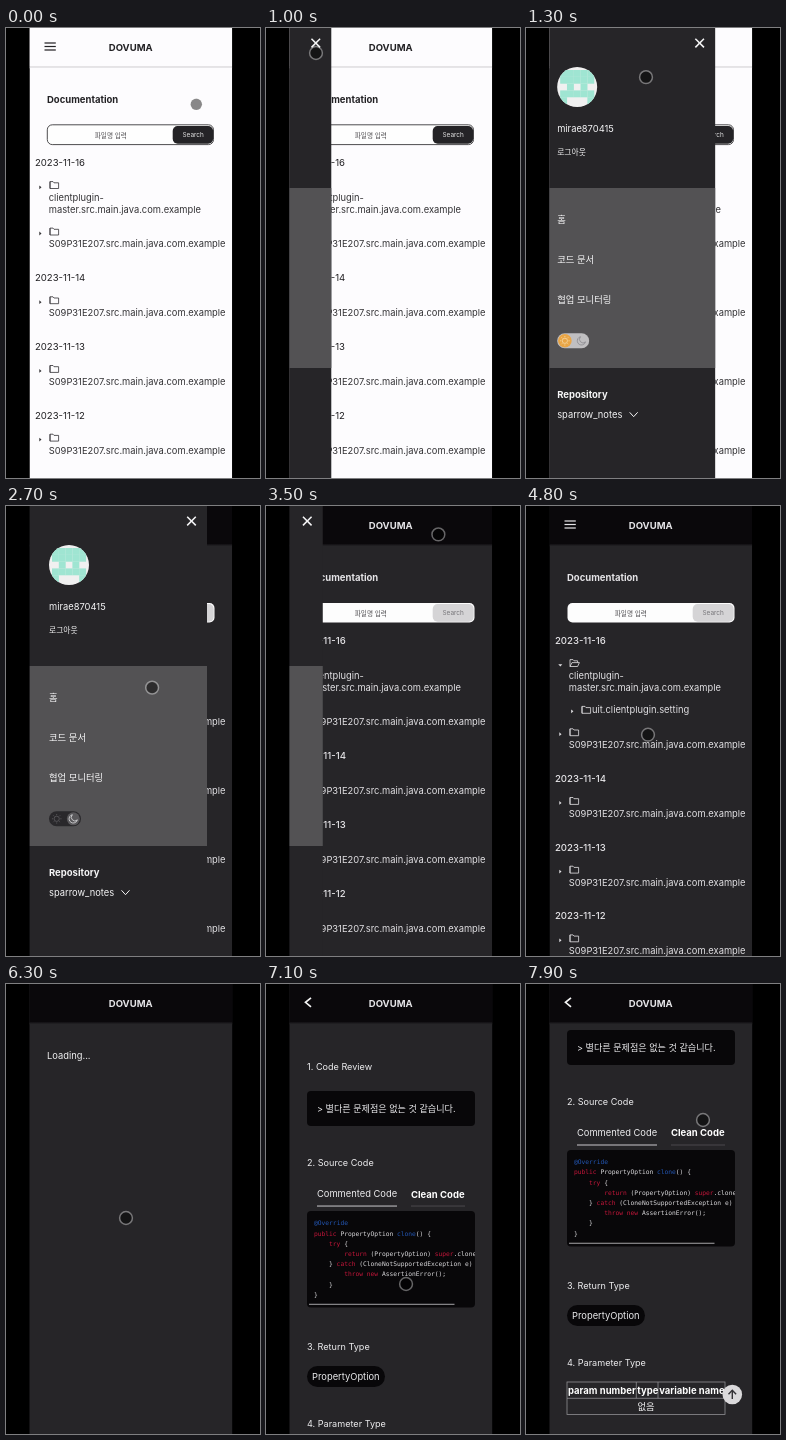
These frames come from a looping animation (254 by 450 pixels, 8000 ms). An HTML page with a canvas:

```html
<!DOCTYPE html>
<html lang="ko">
<head>
<meta charset="utf-8">
<title>Documentation browser</title>
<style>
html, body { margin: 0; width: 100%; height: 100%; overflow: hidden; background: #000; }
canvas { display: block; width: 254px; height: 450px; }
</style>
</head>
<body>
<canvas id="stage"></canvas>
<script>
const W = 254, H = 450, LOOP = 8000;
const LEFT = 23.5, RIGHT = 226.2, HEADER = 38.3;
const SANS = 'Inter, "Noto Sans CJK KR", "Noto Sans CJK", sans-serif';
const MONO = '"DejaVu Sans Mono", monospace';
const BASE = 9.35, ROW = 22.7;
const BOLD = { weight: 700, size: 9.5 };

const canvas = document.getElementById('stage');
const ctx = canvas.getContext('2d');
const dpr = window.devicePixelRatio || 1;
canvas.width = W * dpr;
canvas.height = H * dpr;

const LIGHT = { page: '#fdfcfe', header: '#fdfcfe', ink: '#333235', title: '#222124', line: '#c4c3c6', date: 400 };
const DARK = { page: '#262528', header: '#0a080b', ink: '#e2e1e4', title: '#e6e5e8', line: '#141316', date: 500 };

// Pointer path: time, x, y
const PATH = [
  [0, 190.3, 76.3], [100, 190.3, 76.3], [800, 50, 25], [1000, 50, 25], [1300, 120, 49],
  [1800, 66, 312], [1950, 66, 312], [2200, 69, 313], [2350, 69, 313], [2700, 146, 182],
  [3150, 185, 16], [3350, 185, 16], [4000, 92.7, 135.5], [4200, 94, 160], [4400, 98, 176],
  [4550, 98, 176], [4800, 122, 228.7], [5100, 112, 207], [5300, 112, 207], [5800, 129, 236],
  [6050, 129, 236], [6120, 120, 234], [6800, 120, 234], [7100, 140, 300], [7500, 158, 190],
  [7900, 177, 136], [8000, 177, 136]
];

const clamp = v => Math.max(0, Math.min(1, v));
const easeOut = p => 1 - Math.pow(1 - clamp(p), 3);

// Monotone cubic through the path points
function along(axis, t) {
  let i = 0;
  while (i < PATH.length - 2 && PATH[i + 1][0] <= t) i++;
  const slope = k => k < 0 || k >= PATH.length - 1 ? 0
    : (PATH[k + 1][axis] - PATH[k][axis]) / (PATH[k + 1][0] - PATH[k][0]);
  const tangent = k => {
    const a = slope(k - 1), b = slope(k);
    return a * b <= 0 ? 0 : 2 * a * b / (a + b);
  };
  const d = PATH[i + 1][0] - PATH[i][0], u = (t - PATH[i][0]) / d, v = 1 - u;
  return PATH[i][axis] * (1 + 2 * u) * v * v + tangent(i) * d * u * v * v
    + PATH[i + 1][axis] * u * u * (3 - 2 * u) - tangent(i + 1) * d * u * u * v;
}

function box(x, y, w, h, color) {
  ctx.fillStyle = color;
  ctx.fillRect(x, y, w, h);
}

function round(x, y, w, h, r, fill, stroke, width = 1) {
  ctx.beginPath();
  ctx.roundRect(x, y, w, h, r);
  if (fill) { ctx.fillStyle = fill; ctx.fill(); }
  if (stroke) { ctx.strokeStyle = stroke; ctx.lineWidth = width; ctx.stroke(); }
}

function disc(x, y, r, fill, stroke, width = 1) {
  ctx.beginPath();
  ctx.arc(x, y, r, 0, Math.PI * 2);
  if (fill) { ctx.fillStyle = fill; ctx.fill(); }
  if (stroke) { ctx.strokeStyle = stroke; ctx.lineWidth = width; ctx.stroke(); }
}

function line(points, color, width = 1) {
  ctx.beginPath();
  points.forEach(([x, y], i) => i ? ctx.lineTo(x, y) : ctx.moveTo(x, y));
  ctx.strokeStyle = color;
  ctx.lineWidth = width;
  ctx.stroke();
}

// y is the middle of the capitals
function text(s, x, y, color, { size = BASE, weight = 400, align = 'left', font = SANS } = {}) {
  ctx.font = `${weight} ${size}px ${font}`;
  ctx.textAlign = align;
  ctx.fillStyle = color;
  ctx.fillText(s, x, y + size * 0.365);
}

function clipTo(x, y, w, h, draw) {
  ctx.save();
  ctx.beginPath();
  ctx.rect(x, y, w, h);
  ctx.clip();
  draw();
  ctx.restore();
}

function header(c, icon) {
  const shade = ctx.createLinearGradient(0, HEADER, 0, HEADER + 2);
  shade.addColorStop(0, c.line);
  shade.addColorStop(1, c.page);
  box(LEFT, HEADER, RIGHT - LEFT, 2, shade);
  box(LEFT, 0, RIGHT - LEFT, HEADER, c.header);
  text('DOVUMA', 124.7, 19.3, c.title, { ...BOLD, align: 'center' });
  if (icon === 'menu') [15, 18.5, 22].forEach(y => box(38.5, y - 0.6, 11.3, 1.2, c.title));
  if (icon === 'back') line([[45, 13.8], [39.5, 18.3], [45, 22.8]], '#f4f4f4', 1.7);
}

function triangle(x, y, open, color) {
  ctx.beginPath();
  if (open) { ctx.moveTo(x - 2, y - 1); ctx.lineTo(x + 2, y - 1); ctx.lineTo(x, y + 1.2); }
  else { ctx.moveTo(x - 1, y - 1.9); ctx.lineTo(x + 1.2, y); ctx.lineTo(x - 1, y + 1.9); }
  ctx.fillStyle = color;
  ctx.fill();
}

function folder(x, y, open, color) {
  const l = x - 4.3, r = x + 4.3, t = y - 3.4, b = y + 3.5, w = 0.8;
  if (open) {
    line([[l, b], [l, t], [l + 3, t], [l + 4, t + 1.2], [r - 1, t + 1.2], [r - 1, t + 3]], color, w);
    line([[l, b], [l + 2, t + 3], [r + 0.8, t + 3], [r - 1, b], [l, b]], color, w);
  } else {
    line([[l, b], [l, t], [l + 3, t], [l + 4, t + 1.2], [r, t + 1.2], [r, b], [l, b], [l, t]], color, w);
  }
}

function search(dark) {
  if (dark) {
    round(41.5, 97, 167, 19.5, 5, '#fdfdfd');
    round(166.7, 98, 41, 17.7, 5, '#d5d4d6');
  } else {
    round(41.3, 96.8, 166.2, 19.8, 5, '#fefefe', '#3a393c', 0.9);
    round(166.7, 98, 40.4, 17.8, 5, '#242326');
  }
  text('파일명 입력', 104.8, 107.2, '#4a494c', { size: 6.6, weight: 500, align: 'center' });
  text('Search', 187.1, 106.7, dark ? '#77767a' : '#e4e4e4', { size: 6.4, align: 'center' });
}

function packageRow(y, c) {
  triangle(34.3, y + 2, false, c.ink);
  folder(48.3, y, false, c.ink);
  text('S09P31E207.src.main.java.com.example', 42.7, y + 12.5, c.ink);
}

function listPage(t, dark) {
  const c = dark ? DARK : LIGHT;
  const open = t >= 4600, deep = t >= 5400;
  const shift = ROW * (open + deep);
  const date = (day, y) => text('2023-11-' + day, 28.9, y, c.title, { size: 9.6, weight: c.date });
  box(LEFT, 0, RIGHT - LEFT, H, c.page);
  header(c, 'menu');
  text('Documentation', 41, 71.5, c.title, BOLD);
  search(dark);
  date(16, 134.3);
  triangle(34.3, 159.3, open, c.ink);
  folder(48.3, 157, open, c.ink);
  text('clientplugin-', 42.7, 169.6, c.ink);
  text('master.src.main.java.com.example', 42.7, 181.3, c.ink);
  if (open) {
    triangle(46.2, 205.3, deep, c.ink);
    folder(60.3, 203.8, deep, c.ink);
    text('uit.clientplugin.setting', 66, 204, c.ink);
  }
  if (deep) {
    triangle(58.2, 228, false, c.ink);
    folder(72.3, 226.5, false, c.ink);
    text('PropertyOption', 78, 226.7, c.ink);
  }
  packageRow(203.5 + shift, c);
  [14, 13, 12].forEach((day, i) => {
    const y = 249.7 + i * 68.7 + shift;
    date(day, y);
    packageRow(y + 22.5, c);
  });
}

function avatar(x, y) {
  ctx.save();
  disc(x, y, 20, '#f0f0f0');
  ctx.clip();
  const cell = 6.8;
  ['11111', '11111', '01010', '11111', '10001'].forEach((row, j) => {
    [...row].forEach((on, i) => {
      if (on === '1') box(x + (i - 2.5) * cell, y + (j - 2.5) * cell, cell + 0.1, cell + 0.1, '#9fe5d2');
    });
  });
  ctx.restore();
}

function moon(x, y, color) {
  ctx.beginPath();
  ctx.arc(x, y, 4.2, -1.8, 0.25, true);
  ctx.arc(x + 1.6, y - 1.5, 3.6, 0.8, 3.9);
  ctx.closePath();
  ctx.strokeStyle = color;
  ctx.lineWidth = 0.8;
  ctx.stroke();
}

function sun(x, y, color) {
  disc(x, y, 2.6, null, color, 0.8);
  for (let a = 0; a < 8; a++) {
    const p = Math.cos(a * Math.PI / 4), q = Math.sin(a * Math.PI / 4);
    line([[x + p * 3.6, y + q * 3.6], [x + p * 4.8, y + q * 4.8]], color, 0.8);
  }
}

function toggle(dark) {
  round(43, 305.3, 32, 15, 7.5, dark ? '#29282b' : '#c0bfc1');
  if (dark) {
    sun(50.7, 312.8, '#5d5c60');
    disc(67.3, 312.8, 6.5, '#59585b');
    moon(67.3, 312.8, '#e0e0e2');
  } else {
    disc(50.7, 312.8, 6.8, '#e9a545');
    sun(50.7, 312.8, '#f8d9a4');
    moon(67.3, 312.8, '#8b8a8e');
  }
}

function drawer(shown, dark) {
  if (shown <= 0) return;
  clipTo(LEFT, 0, RIGHT - LEFT, H, () => {
    ctx.translate(-178 * (1 - shown), 0);
    box(LEFT, 0, 177.5, H, '#262528');
    box(LEFT, 160, 177.5, 180, '#535254');
    const ink = '#f5f5f6';
    line([[181.2, 10.8], [189.8, 19.4]], ink, 1.5);
    line([[189.8, 10.8], [181.2, 19.4]], ink, 1.5);
    avatar(63, 59);
    text('mirae870415', 43, 100.3, ink);
    text('로그아웃', 43, 124, ink, { size: 7.8 });
    text('홈', 43, 191.5, ink);
    text('코드 문서', 43, 231.8, ink);
    text('협업 모니터링', 43, 271.8, ink);
    toggle(dark);
    text('Repository', 43, 366.7, ink, BOLD);
    text('sparrow_notes', 43, 386.7, ink);
    line([[115.5, 384.3], [119.5, 388.7], [123.5, 384.3]], ink);
  });
}

const RED = '#c4163a', BLUE = '#2357b5', PLAIN = '#dcdbde';
const CODE = [
  [0, [BLUE, '@Override']],
  [0, [RED, 'public'], [PLAIN, ' PropertyOption '], [BLUE, 'clone'], [PLAIN, '() {']],
  [4, [RED, 'try'], [PLAIN, ' {']],
  [8, [RED, 'return'], [PLAIN, ' (PropertyOption) '], [RED, 'super'], [PLAIN, '.clone();']],
  [4, [PLAIN, '} '], [RED, 'catch'], [PLAIN, ' (CloneNotSupportedException e) {']],
  [8, [RED, 'throw new'], [PLAIN, ' AssertionError();']],
  [4, [PLAIN, '}']],
  [0, [PLAIN, '}']]
];

function codeBlock() {
  round(41, 166, 168, 96.5, 4, '#080709');
  clipTo(41, 166, 168, 96, () => {
    CODE.forEach(([indent, ...parts], i) => {
      let x = 48 + indent * 3.77;
      parts.forEach(([color, s]) => {
        text(s, x, 178 + i * 10.2, color, { size: 6.27, font: MONO });
        x += ctx.measureText(s).width;
      });
    });
  });
  box(43, 258.7, 145.5, 1.2, '#8b8a8d');
}

function table() {
  const edge = '#8f8e92';
  ctx.strokeStyle = edge;
  ctx.lineWidth = 0.8;
  ctx.strokeRect(41, 398, 158, 32.5);
  line([[41, 414.3], [199, 414.3]], edge, 0.8);
  [110.3, 132].forEach(x => line([[x, 398], [x, 414.3]], edge, 0.8));
  text('param number', 42, 406.3, '#fff', BOLD);
  text('type', 111.3, 406.3, '#fff', BOLD);
  text('variable name', 133.2, 406.3, '#fff', BOLD);
  text('없음', 120, 422.3, '#f0f0f1', { align: 'center' });
}

function docPage(t) {
  const ink = '#ececee', heading = { size: 9.1 };
  const scroll = easeOut((t - 7000) / 880);
  box(LEFT, 0, RIGHT - LEFT, H, DARK.page);
  clipTo(LEFT, HEADER, RIGHT - LEFT, H - HEADER, () => {
    ctx.translate(0, 88 * (1 - scroll));
    text('1. Code Review', 41, 22, ink, heading);
    round(41, 46, 168, 35, 4, '#080709');
    text('> 별다른 문제점은 없는 것 같습니다.', 51, 63.3, ink, { size: 9.1 });
    text('2. Source Code', 41, 117.5, ink, heading);
    text('Commented Code', 51, 149, ink);
    text('Clean Code', 145, 149, '#fff', BOLD);
    box(51, 160.5, 80, 1, '#c9c8cb');
    box(145, 160.5, 54, 1, '#4a494c');
    codeBlock();
    text('3. Return Type', 41, 302, ink, heading);
    round(41, 321, 78, 21, 10.5, '#080709');
    text('PropertyOption', 46, 331.5, ink);
    text('4. Parameter Type', 41, 379, ink, heading);
    table();
  });
  header(DARK, 'back');
  if (t >= 7200) {
    disc(206.3, 410.5, 9.8, '#dad9db');
    line([[206.3, 415], [206.3, 406.5]], '#333236', 1.4);
    line([[202.5, 410.2], [206.3, 406.3], [210.1, 410.2]], '#333236', 1.4);
  }
}

function loadingPage() {
  box(LEFT, 0, RIGHT - LEFT, H, DARK.page);
  header(DARK);
  text('Loading...', 41, 71.5, '#f0f0f1');
}

// The pale ring only shows on dark pages
function pointer(t) {
  const x = along(1, t), y = along(2, t);
  disc(x, y, 5.8, 'rgba(0,0,0,.46)');
  disc(x, y, 6.4, null, 'rgba(255,255,255,.38)', 1.5);
}

function draw(t) {
  const dark = t >= 2400;
  ctx.setTransform(dpr, 0, 0, dpr, 0, 0);
  box(0, 0, W, H, '#000');
  if (t < 6300) {
    clipTo(LEFT, 0, RIGHT - LEFT, H, () => listPage(t, dark));
    drawer(easeOut((t - 950) / 590) - easeOut((t - 3250) / 590), dark);
  } else if (t < 6900) {
    loadingPage();
  } else {
    docPage(t);
  }
  pointer(t);
}

const start = performance.now();
function tick() {
  draw((performance.now() - start) % LOOP);
  requestAnimationFrame(tick);
}
tick();
</script>
</body>
</html>
```
